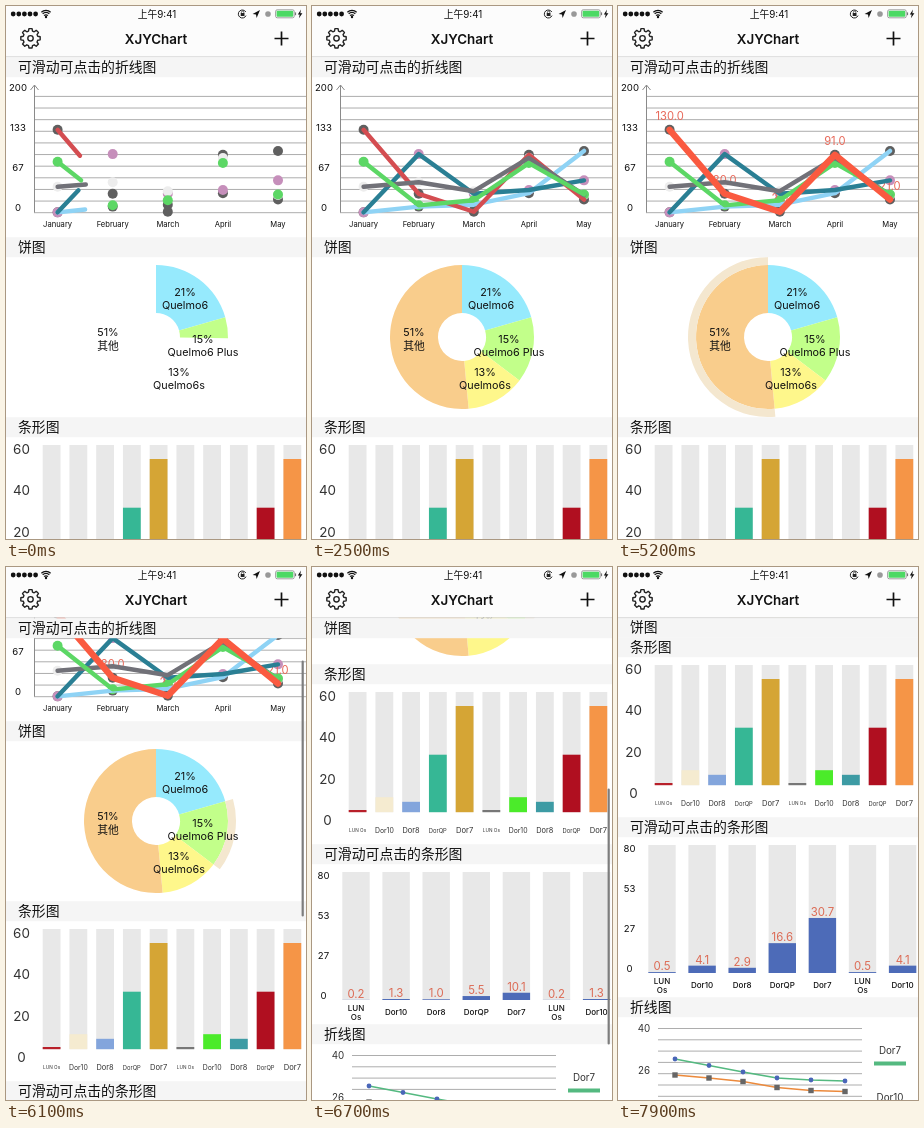
Recreate the animation shown at these times as an HTML page. Size 300 by 533 pixels, loop 8 s.

```html
<!DOCTYPE html>
<html lang="zh">
<head>
<meta charset="utf-8">
<title>XJYChart</title>
<style>
  html, body { margin: 0; width: 100%; height: 100%; overflow: hidden; background: #fff; }
  svg { display: block; width: 300px; height: 533px; font-family: Inter, "Noto Sans CJK SC", "Noto Sans CJK", sans-serif; }
</style>
</head>
<body>
<svg id="stage" viewBox="0 0 300 533"></svg>
<script>
const LOOP = 8000, STEP = 100;
const TOP = 51.2, SECTION = 180, HEAD = 20;
const stage = document.getElementById('stage');

function el(parent, tag, attrs = {}) {
  const node = document.createElementNS('http://www.w3.org/2000/svg', tag);
  set(node, attrs);
  return parent.appendChild(node);
}
function set(node, attrs) {
  for (const key in attrs) node.setAttribute(key, attrs[key]);
}
const group = parent => el(parent, 'g');
const rect = (parent, x, y, width, height, fill) => el(parent, 'rect', { x, y, width, height, fill });
const circle = (parent, cx, cy, r, fill) => el(parent, 'circle', { cx, cy, r, fill });
const stroke = (parent, d, color, width, more) =>
  el(parent, 'path', { d, fill: 'none', stroke: color, 'stroke-width': width, ...more });

// Text centred vertically on y.
function text(parent, str, x, y, size, more) {
  const node = el(parent, 'text', { x, y: y + size * 0.365, 'font-size': size, 'text-anchor': 'middle', fill: '#111', ...more });
  node.textContent = str;
  return node;
}
const polyline = points => 'M' + points.map(p => p.join()).join('L');
const clamp = v => Math.max(0, Math.min(1, v));
const easeInOut = x => x < 0.5 ? 2 * x * x : 1 - 2 * (1 - x) ** 2;

const page = group(stage);

// Scrollable line chart: 0 to 200 over 128 px
const lineChart = group(page);
const months = ['January', 'February', 'March', 'April', 'May'];
const monthX = i => 51.6 + 55.1 * i;
const valueY = v => 207 - 0.64 * v;
for (let i = 0; i < 11; i++) {
  stroke(lineChart, `M28 ${206.7 - 11.63 * i}H300`, '#adadad', 1);
}
stroke(lineChart, 'M28.5 206.5V79M24.5 84L28.5 79L32.5 84', '#8a8a8a', 1);
['200', '133', '67', '0'].forEach((s, i) => text(lineChart, s, 12, 81 + 40 * i, 9.6));
months.forEach((s, i) => text(lineChart, s, monthX(i), 218.5, 7.6));

const series = [
  { color: '#8fd3f5', dot: '#5f5f5f', values: [1, 10, 13, 31, 97] },
  { color: '#d44d51', dot: '#5f5f5f', values: [130, 30, 2, 91, 21] },
  { color: '#2a7f94', dot: '#c68fbb', values: [1, 92, 30, 36, 51] },
  { color: '#717178', dot: '#ededed', values: [41, 48, 34, 86, 28] },
  { color: '#5cd765', dot: '#5cd765', values: [80, 12, 20, 78, 29] }
];
for (const s of series) {
  s.points = s.values.map((v, i) => [monthX(i), valueY(v)]);
  s.points.forEach(([x, y]) => circle(lineChart, x, y, 5, s.dot));
}
const tagLayer = group(lineChart);
const strokeStyle = { 'stroke-linecap': 'round', 'stroke-linejoin': 'round', pathLength: 1 };
const lines = [0, 2, 1, 3, 4].map(i => stroke(lineChart, polyline(series[i].points), series[i].color, 4.4, strokeStyle));
const chosen = series[1];
const tags = chosen.points.map(([x, y]) => text(tagLayer, '', x, y - 14, 11.2, { fill: '#e8695a' }));
const highlight = stroke(lineChart, polyline(chosen.points), '#fa5a40', 6.4, strokeStyle);

// Pie chart
const pie = group(page);
const slices = [[14, '#96eafd'], [10, '#c2ff8a'], [9, '#fef78b'], [35, '#f9cd8c']];
const whole = slices.reduce((sum, [amount]) => sum + amount, 0);
let total = 0;
for (const slice of slices) {
  slice.from = total / whole;
  slice.to = (total += slice[0]) / whole;
}
function wedge(from, to, inner, outer) {
  if (to <= from) return '';
  const at = (turn, r) => [150 + r * Math.sin(turn * 2 * Math.PI), 331 - r * Math.cos(turn * 2 * Math.PI)].join(' ');
  const large = to - from > 0.5 ? 1 : 0;
  return `M${at(from, outer)}A${outer} ${outer} 0 ${large} 1 ${at(to, outer)}` +
    `L${at(to, inner)}A${inner} ${inner} 0 ${large} 0 ${at(from, inner)}Z`;
}
for (const slice of slices) slice.node = el(pie, 'path', { fill: slice[1] });
const ring = el(pie, 'path', { fill: '#f4e7cf' });
[
  ['21%', 'Quelmo6', 179, 286], ['15%', 'Quelmo6 Plus', 197, 333],
  ['13%', 'Quelmo6s', 173, 366], ['51%', '其他', 102, 326.5]
].forEach(([share, name, x, y]) => {
  text(pie, share, x, y, 10.8);
  text(pie, name, x, y + 13.3, 10.8);
});

// Bar chart
const systems = ['LUN Os', 'Dor10', 'Dor8', 'DorQP', 'Dor7'];
const systemSize = [4.7, 6.9, 7.4, 5.8, 7.6];
const barHeights = [2.2, 15, 10.4, 57.5, 106.2];
const barColors = ['#b8202a', '#f5ebd0', '#83a5dc', '#36b795', '#d5a535',
  '#777777', '#4beb2a', '#3d9ba4', '#b00f20', '#f59547'];
['60', '40', '20', '0'].forEach((s, i) => text(page, s, 15.5, 443 + 41.4 * i, 13.4, { fill: '#333' }));
barColors.forEach((color, i) => {
  const x = 36.7 + 26.75 * i, h = barHeights[i % 5];
  rect(page, x, 439, 17.8, 120.2, '#e8e8e8');
  rect(page, x, 559.2 - h, 17.8, h, color);
  text(page, systems[i % 5], x + 8.9, 577.5, systemSize[i % 5], { fill: '#333' });
});

// Scrollable bar chart
['80', '53', '27', '0'].forEach((s, i) => text(page, s, 11.5, 622 + 40 * i, 9.6));
const growing = [0.56, 4.6, 3.27, 18.65, 34.4, 0.56, 4.6].map((value, i) => {
  const x = 30.3 + 40.1 * i, mid = x + 13.7;
  rect(page, x, 619, 27.4, 128, '#e8e8e8');
  const words = systems[i % 5].split(' ');
  words.forEach((s, k) => text(page, s, mid, words.length > 1 ? 755 + 9.4 * k : 759.5, 8, { 'font-weight': 500 }));
  return {
    value,
    bar: rect(page, x, 747, 27.4, 0, '#4d6bb8'),
    tag: text(page, '', mid, 740, 11.4, { fill: '#dc6b55' })
  };
});

// Plain line chart
const pointX = i => 57 + 34 * i;
for (let i = 0; i < 8; i++) stroke(page, `M40 ${802.5 + 11.3 * i}H244`, '#adadad', 1);
['40', '26'].forEach((s, i) => text(page, s, 26, 802.5 + 42 * i, 9.8, { fill: '#333' }));
function plainLine(ys, color, mark) {
  const points = ys.map((y, i) => [pointX(i), y]);
  stroke(page, polyline(points), color, 1.6);
  points.forEach(([x, y]) => mark(x, y));
}
plainLine([833, 839.5, 846, 852, 854, 855], '#54b980', (x, y) => circle(page, x, y, 2.4, '#4a66b8'));
plainLine([849, 852, 855.5, 861.5, 864.5, 865.5], '#ec8a3c', (x, y) => rect(page, x - 2.7, y - 2.7, 5.4, 5.4, '#666'));
text(page, 'Dor7', 272, 824, 9.8, { fill: '#333' });
rect(page, 256, 835.5, 32, 4, '#54b980');
text(page, 'Dor10', 272, 871.5, 9.8, { fill: '#333' });

// Section headers that stick below the navigation bar
const headers = ['可滑动可点击的折线图', '饼图', '条形图', '可滑动可点击的条形图', '折线图'].map(title => {
  const node = group(stage);
  rect(node, 0, 0, 300, HEAD, '#f5f5f5');
  text(node, title, 12, 9.6, 13.85, { 'text-anchor': 'start' });
  return node;
});
const indicator = el(stage, 'rect', { x: 295.6, width: 2.2, height: 256, rx: 1.1, fill: '#7d7d7d' });

// Status and navigation bars
const nav = group(stage);
rect(nav, 0, 0, 300, 50.6, '#fcfcfc');
rect(nav, 0, 50.4, 300, 0.7, '#cfcfcf');
for (let i = 0; i < 5; i++) circle(nav, 7.2 + 5.6 * i, 8, 2.4, '#111');
for (const r of [2.6, 4.6, 6.4]) {
  stroke(nav, `M${40 - r * 0.72} ${12 - r * 0.9}A${r} ${r} 0 0 1 ${40 + r * 0.72} ${12 - r * 0.9}`, '#111', 1.3);
}
circle(nav, 40, 11, 1.2, '#111');
text(nav, '上午9:41', 151, 8, 9.8);
stroke(nav, 'M239.8 6A4 4 0 1 0 240 9.6', '#222', 1);
rect(nav, 234.7, 7, 3.8, 3, '#222');
stroke(nav, 'M235.4 7V6.3A1.2 1.2 0 0 1 237.8 6.3V7', '#222', 0.7);
el(nav, 'path', { d: 'M254 4L250.6 12L250 8.5L246.6 8Z', fill: '#111' });
circle(nav, 262, 8, 2.8, '#999');
el(nav, 'rect', { x: 269.6, y: 3.8, width: 18.6, height: 8, rx: 1.6, fill: '#fff', stroke: '#777', 'stroke-width': 0.7 });
el(nav, 'rect', { x: 270.6, y: 4.8, width: 16.6, height: 6, rx: 0.8, fill: '#4cd964' });
rect(nav, 289, 6.4, 1.1, 2.8, '#777');
el(nav, 'path', { d: 'M295 3.5L291.8 8.4H293.7L292.9 12.3L296.4 7.2H294.3Z', fill: '#111' });
const teeth = [];
for (let i = 0; i < 8; i++) {
  for (const [off, r] of [[-0.27, 7.5], [-0.16, 9.8], [0.16, 9.8], [0.27, 7.5]]) {
    const a = i * Math.PI / 4 + off;
    teeth.push([24.5 + r * Math.sin(a), 32.3 - r * Math.cos(a)]);
  }
}
stroke(nav, polyline(teeth) + 'Z', '#222', 1.4, { 'stroke-linejoin': 'round' });
el(nav, 'circle', { cx: 24.5, cy: 32.3, r: 2.7, fill: 'none', stroke: '#222', 'stroke-width': 1.4 });
text(nav, 'XJYChart', 150, 33, 13.4, { 'font-weight': 600 });
stroke(nav, 'M268.5 32.5H282.5M275.5 25.5V39.5', '#111', 1.7);

// Scroll distance every 100 ms from 5800 ms on
const scrollSteps = [0, 10, 36, 77, 130, 186, 236, 272, 297, 314, 325, 331, 335, 338, 340, 341];
function scrollAt(t) {
  const i = Math.floor((t - 5800) / STEP);
  return scrollSteps[Math.max(0, Math.min(i, scrollSteps.length - 1))];
}

function render(t) {
  const drawn = clamp((t + 240) / 2050);
  lines.forEach(line => set(line, { 'stroke-dasharray': drawn < 1 ? `${drawn} 2` : 'none' }));

  const picked = t >= 3100;
  highlight.style.display = tagLayer.style.display = picked ? '' : 'none';
  const counted = clamp((t - 3000) / 1300);
  tags.forEach((tag, i) => tag.textContent = (chosen.values[i] * counted).toFixed(1));

  const sweep = clamp(0.253 + t * 0.00066);
  for (const s of slices) set(s.node, { d: wedge(s.from, Math.min(s.to, sweep), 24, 72) });
  const active = t >= 5900 ? slices[1] : t >= 4700 ? slices[3] : null;
  set(ring, { d: active ? wedge(active.from, active.to, 72, 80) : '' });

  const grown = easeInOut(clamp((t - 6340) / 1400));
  const count = clamp((t - 6115) / 2000);
  for (const { value, bar, tag } of growing) {
    const h = value * 1.6 * grown;
    set(bar, { y: 747 - h, height: h });
    set(tag, { y: 745 - h });
    tag.textContent = (value * count).toFixed(1);
  }

  const scroll = scrollAt(t);
  set(page, { transform: `translate(0 ${-scroll})` });
  headers.forEach((node, i) => {
    const natural = TOP + SECTION * i - scroll;
    const y = Math.min(Math.max(natural, TOP), natural + SECTION - HEAD);
    set(node, { transform: `translate(0 ${y})` });
  });
  set(indicator, { y: 52 + 0.54 * scroll, opacity: t < 5900 ? 0 : clamp((7800 - t) / 300) });
}

function frame(now) {
  render(Math.floor(now % LOOP / STEP) * STEP);
  requestAnimationFrame(frame);
}
render(0);
requestAnimationFrame(frame);
</script>
</body>
</html>
```
